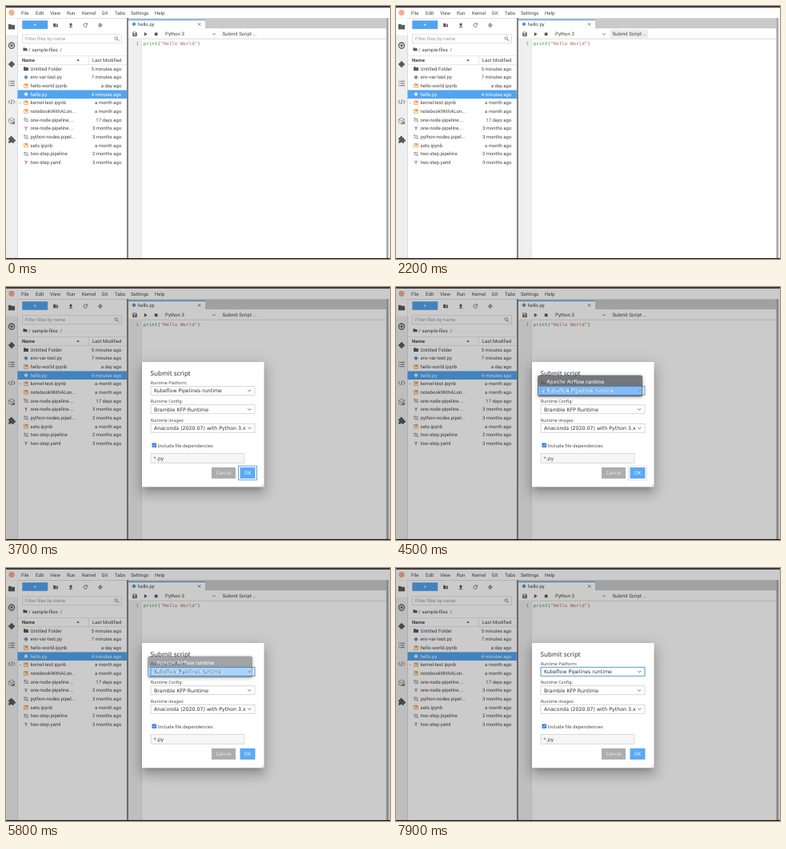
Animation, 480 px wide and 317 px high, one loop 8000 ms. Source, as an HTML page:

```html
<!DOCTYPE html>
<html lang="en">
<head>
<meta charset="utf-8">
<title>Submit script</title>
<style>
html, body { margin: 0; width: 100%; height: 100%; overflow: hidden; background: #fff; }
svg { display: block; width: 480px; height: 317px; }
text { font-family: Roboto, sans-serif; font-size: 6px; fill: #444; text-rendering: geometricPrecision; white-space: pre; }
.form text { font-family: "Noto Sans", sans-serif; }
.form .value { font-family: "DejaVu Sans", sans-serif; }
.menu text { font-family: Inter, sans-serif; }
.mono { font-family: "DejaVu Sans Mono", monospace; }
</style>
</head>
<body>
<svg id="stage" viewBox="0 0 480 317">
  <g id="app"></g>
  <g id="hover"></g>
  <g id="submit"></g>
  <g id="modal">
    <g id="shade"></g>
    <g id="dialog" class="form"></g>
    <g id="okFocus"></g>
    <g id="selectFocus"></g>
    <g id="popup" class="menu"></g>
  </g>
</svg>
<script>
const LOOP = 8000;
const BLUE = '#52a4f0';
const INK = '#5a5a5a';
const $ = id => document.getElementById(id);

function add(parent, tag, attrs, content) {
  const el = document.createElementNS('http://www.w3.org/2000/svg', tag);
  for (const k in attrs) el.setAttribute(k, attrs[k]);
  if (content) el.textContent = content;
  parent.appendChild(el);
  return el;
}
const rect = (p, x, y, width, height, fill, more) => add(p, 'rect', { x, y, width, height, fill, ...more });
const line = (p, d, stroke = INK, width = 0.8) => add(p, 'path', { d, fill: 'none', stroke, 'stroke-width': width });
const shape = (p, d, fill = INK) => add(p, 'path', { d, fill });
const dot = (p, cx, cy, r, fill, more) => add(p, 'circle', { cx, cy, r, fill, ...more });
function text(p, x, y, str, size = 6, { cls = '', fill, ...more } = {}) {
  const el = add(p, 'text', { x, y, class: cls, ...more }, str);
  el.style.fontSize = size + 'px';
  if (fill) el.style.fill = fill;
  return el;
}
// Same geometry as a CSS box-shadow: vertical offset, blur and spread.
function shadow(p, x, y, w, h, dy, blur, spread, opacity) {
  const el = rect(p, x - spread, y - spread + dy, w + 2 * spread, h + 2 * spread, '#000', { opacity });
  el.style.filter = `blur(${blur / 2}px)`;
}

const folder = (p, x, y, s = 1, fill = INK) =>
  add(p, 'path', { d: 'M-3-2.4h2.3l.8.8H3v4H-3z', fill, transform: `translate(${x} ${y}) scale(${s})` });
const diamond = (p, x, y, side, fill) =>
  rect(p, x - side / 2, y - side / 2, side, side, fill, { transform: `rotate(45 ${x} ${y})` });

const icons = {
  folder,
  python: (p, x, y, fill = '#5a94c8') => diamond(p, x, y, 3.9, fill),
  notebook(p, x, y) {
    rect(p, x - 2.3, y - 2.3, 4.6, 4.6, 'none', { stroke: '#ef9a4a', 'stroke-width': 0.8 });
    shape(p, `M${x - 0.9} ${y - 2.2}h2.3v3l-1.1-.8-1.2.8z`, '#ef8d32');
  },
  pipeline(p, x, y) {
    line(p, `M${x - 2.4} ${y - 1.7}h3.4q1.4 0 1.4 .9t-1.4 .8h-2q-1.4 0-1.4 .9t1.4 .9h3.4`, '#8a8a8a', 0.7);
    dot(p, x - 2, y - 1.7, 0.8, '#777');
    dot(p, x + 2, y + 1.8, 0.8, '#777');
  },
  yaml: (p, x, y) => line(p, `M${x - 1.6} ${y - 2.2}l1.6 2.3 1.6-2.3M${x} ${y}v2.4`, '#c8415a', 0.9)
};

function drawMenu(p) {
  rect(p, 0, 0, 480, 317, '#fff');
  dot(p, 7, 8.3, 3.6, '#f3ae92');
  const items = { File: 19, Edit: 37, View: 55, Run: 76, Kernel: 95, Git: 119.5, Tabs: 136, Settings: 156, Help: 186 };
  for (const name in items) text(p, items[name], 10.8, name, 6.1);
  rect(p, 0, 15, 480, 0.6, '#ccc');
}

function drawSidebar(p) {
  rect(p, 0, 15.5, 14.5, 301, '#eeeeee');
  rect(p, 14, 15.5, 0.6, 301, '#c8c8c8');
  rect(p, 0, 15.5, 14.5, 21, '#fff');
  folder(p, 7, 26, 1.35);
  dot(p, 7, 49.5, 3.5, 'none', { stroke: INK, 'stroke-width': 1.3 });
  rect(p, 5.6, 48.1, 2.8, 2.8, INK);
  diamond(p, 7, 73, 6, INK);
  for (const y of [94.3, 97, 99.7]) line(p, `M3.2 ${y}h1.2M5.4 ${y}h5.4`, INK, 0.9);
  line(p, 'M5 117.8l-2 2.4 2 2.4M9 117.8l2 2.4-2 2.4M7.7 117.4l-1.4 5.6', INK, 0.8);
  line(p, 'M7 140l3.4 2v4l-3.4 2-3.4-2v-4zM3.6 142l3.4 2 3.4-2M7 144v4', '#808080', 0.7);
  dot(p, 9.5, 146.5, 1.7, '#808080');
  shape(p, 'M3.2 165h2a1.5 1.5 0 1 1 2.8 0h2v2.2a1.4 1.4 0 1 1 0 2.6v1.9h-2.1a1.4 1.4 0 0 0-2.6 0H3.2v-2.3a1.4 1.4 0 0 0 0-2.4z');
}

const files = [
  ['folder', 'Untitled Folder', '5 minutes ago'],
  ['python', 'env-var-test.py', '7 minutes ago'],
  ['notebook', 'hello-world.ipynb', 'a day ago'],
  ['python', 'hello.py', '4 minutes ago'],
  ['notebook', 'kernel-test.ipynb', 'a month ago'],
  ['notebook', 'notebookWithALon...', 'a month ago'],
  ['pipeline', 'one-node-pipeline....', '17 days ago'],
  ['yaml', 'one-node-pipeline....', '3 months ago'],
  ['pipeline', 'python-nodes.pipel...', '3 months ago'],
  ['notebook', 'sets.ipynb', 'a month ago'],
  ['pipeline', 'two-step.pipeline', '2 months ago'],
  ['yaml', 'two-step.yaml', '3 months ago']
];

function drawBrowser(p) {
  rect(p, 20.3, 18.2, 31.9, 10.6, BLUE);
  line(p, 'M36.2 21.8v3.4M34.5 23.5h3.4', '#fff', 0.6);
  folder(p, 62, 24, 0.95);
  line(p, 'M62.8 23v2.4M61.6 24.2h2.4', '#fff', 0.6);
  shape(p, 'M81 21l2.4 2.5H82v2h-2v-2h-1.4zM78.7 26.2h4.6v.8h-4.6z');
  line(p, 'M101.2 22.6a2.3 2.3 0 1 0 .3 2M101.6 21.4v1.8h-1.8', INK, 0.8);
  line(p, 'M115.2 24.2l2.6-2.6 2.5 2.5-2.6 2.6zM117.8 21.4v5M116 24h4.2', INK, 0.7);

  rect(p, 20.3, 35.8, 124.4, 10.8, '#fff', { stroke: '#cfcfcf', 'stroke-width': 0.6 });
  text(p, 24, 43.4, 'Filter files by name', 6, { fill: '#999' });
  dot(p, 137.8, 40.4, 1.8, 'none', { stroke: '#666', 'stroke-width': 0.7 });
  line(p, 'M139.2 41.8l2.2 2.2', '#666', 0.8);
  folder(p, 24, 54.3, 0.85);
  text(p, 28.2, 56.5, '/', 6);
  text(p, 32.5, 56.5, 'sample-files', 6);
  text(p, 67.5, 56.5, '/', 6);

  rect(p, 14.5, 62.3, 136, 0.5, '#d0d0d0');
  rect(p, 14.5, 73, 136, 0.5, '#d0d0d0');
  rect(p, 103, 62.5, 0.5, 10.5, '#d0d0d0');
  text(p, 20, 69.8, 'Name', 6, { 'font-weight': 600 });
  shape(p, 'M88.2 68.8l1.9-2.4 1.9 2.4z');
  text(p, 144.3, 69.8, 'Last Modified', 6, { 'text-anchor': 'end' });

  files.forEach(([kind, name, age], i) => {
    const y = 78.6 + i * 10.66;
    const on = name === 'hello.py';
    const fill = on ? '#fff' : '#444';
    if (on) rect(p, 14.5, y - 5.2, 136.4, 10.6, BLUE);
    icons[kind](p, 25, y, on ? '#d8ecff' : undefined);
    text(p, 30.5, y + 2.1, name, 6.08, { fill });
    text(p, 144.3, y + 2.1, age, 5.95, { 'text-anchor': 'end', fill });
  });
  dot(p, 17.6, 121.4, 0.5, '#555');
}

function drawEditor(p) {
  rect(p, 150.9, 15, 2.3, 301, '#858588');
  rect(p, 153, 15.5, 322.5, 12.7, '#cacaca');
  rect(p, 153, 17.2, 96, 11.2, '#fff');
  rect(p, 153, 17, 96, 1, BLUE);
  icons.python(p, 160, 22.8);
  text(p, 164.8, 25, 'hello.py', 6.1);
  line(p, 'M239.9 21.2l3.4 3.4M243.3 21.2l-3.4 3.4', '#555', 0.7);

  rect(p, 153, 28.3, 322, 12.9, '#fff');
  shape(p, 'M158.3 32.4h4.2l1.1 1.1v4.4h-5.3z');
  rect(p, 159.2, 33, 2.9, 1.4, '#fff');
  dot(p, 161, 36.2, 0.9, '#fff');
  shape(p, 'M172.8 32.7l3.9 2.5-3.9 2.5z');
  rect(p, 185.8, 33.4, 3.7, 3.7, INK);
  text(p, 199, 37, 'Python 3', 6.1);
  line(p, 'M258.2 34.2l1.8 1.8 1.8-1.8', '#555', 0.7);

  rect(p, 153, 40.8, 322, 0.6, '#c4c4c4');
  rect(p, 153, 41.4, 17, 275, '#efefef');
  rect(p, 169.6, 41.4, 0.5, 275, '#ddd');
  text(p, 162.6, 49.4, '1', 5.8, { cls: 'mono', fill: '#8a8a8a' });
  const code = text(p, 171.7, 49.4, '', 5.92, { cls: 'mono' });
  for (const [str, fill] of [['print', '#3f963f'], ['(', '#555'], ['"Hello World"', '#bd5c60'], [')', '#555']])
    add(code, 'tspan', { style: `fill:${fill}` }, str);

  rect(p, 475.4, 15, 2.9, 301, '#a9a9ac');
  rect(p, 478.3, 15, 1.7, 301, '#f4f4f4');
  rect(p, 0, 0, 480, 2, '#3c3b42');
  rect(p, 0, 315.9, 480, 1.1, '#111');
}

function drawSelect(p, y, label, value) {
  text(p, 180.8, y - 2.4, label, 5.3);
  rect(p, 181, y, 130, 11, '#fff', { stroke: '#bdbdbd', 'stroke-width': 0.6 });
  text(p, 185, y + 7.7, value, 6.28, { cls: 'value', fill: '#333' });
  line(p, `M302.4 ${y + 4.6}l1.9 1.9 1.9-1.9`, '#444', 0.8);
}

function drawDialog(p) {
  const shade = $('shade');
  const box = [170, 94, 152.6, 156.4];
  rect(shade, 0, 2, 480, 314, '#000', { opacity: 0.205 });
  shadow(shade, ...box, 4.9, 6.7, -3.1, 0.2);
  shadow(shade, ...box, 8.9, 13.8, 1.3, 0.14);
  shadow(shade, ...box, 4, 16.9, 3.6, 0.12);

  rect(p, ...box, '#fff', { rx: 0.8 });
  text(p, 180.6, 111.4, 'Submit script', 8.1, { fill: '#333' });
  drawSelect(p, 124.3, 'Runtime Platform:', 'Kubeflow Pipelines runtime');
  drawSelect(p, 147.8, 'Runtime Config:', 'Bramble KFP Runtime');
  drawSelect(p, 171.2, 'Runtime images:', 'Anaconda (2020.07) with Python 3.x');
  rect(p, 182.5, 195.4, 5.6, 5.6, '#3b78d8', { rx: 0.8 });
  line(p, 'M183.6 198.2l1.3 1.4 2.1-2.9', '#fff', 0.8);
  text(p, 189.8, 200.9, 'Include file dependencies', 5.75);
  rect(p, 181, 208.6, 117, 11.8, '#f6f6f6', { stroke: '#c6c6c6', 'stroke-width': 0.6 });
  text(p, 184.6, 216.8, '*.py', 6.2, { cls: 'value' });
  rect(p, 257, 226, 30, 14, '#adadad');
  text(p, 272, 235, 'Cancel', 6.1, { 'text-anchor': 'middle', fill: '#eee' });
  rect(p, 292.5, 226, 19, 14, '#5aaaf5');
  text(p, 302, 235, 'OK', 6.1, { 'text-anchor': 'middle', fill: '#fff' });
  line(p, 'M319 250l3-3M320.7 250l1.3-1.3', '#888', 0.4);

  rect($('okFocus'), 290.6, 224.2, 22.8, 17.6, 'none', { stroke: '#4d88b4', 'stroke-width': 0.8 });
  rect($('selectFocus'), 181, 124.3, 130, 11, 'none', { stroke: '#4f9be0', 'stroke-width': 0.9 });
}

function drawPopup(p) {
  shadow(p, 177, 110.4, 131.2, 27, 1, 4, 0.5, 0.3);
  rect(p, 177, 110.4, 131.2, 27, '#484a51', { rx: 3 });
  rect(p, 178, 124.5, 129.2, 10.8, '#58a6f6');
  text(p, 188.3, 121.2, 'Apache Airflow runtime', 6.4, { fill: '#f4f4f4', 'font-weight': 500 });
  text(p, 188.3, 132.3, 'Kubeflow Pipelines runtime', 6.4, { fill: '#fff', 'font-weight': 500 });
  line(p, 'M183 130.2l1.2 1.5 2-3.6', '#fff', 0.8);
}

drawMenu($('app'));
drawSidebar($('app'));
drawBrowser($('app'));
drawEditor($('app'));
rect($('hover'), 267.5, 29.3, 47.5, 11.4, '#ededed');
text($('submit'), 270.5, 37, 'Submit Script ...', 6.1);
drawDialog($('dialog'));
drawPopup($('popup'));

// Share of an eight-step fade that starts at the given time.
const fade = (t, start) => Math.max(0, Math.min(8, Math.floor((t - start) / 100) + 1)) / 8;

function render(t) {
  const opened = fade(t, 4000);
  $('hover').style.display = t >= 2000 && t < 2400 ? '' : 'none';
  $('modal').style.display = t >= 2400 ? '' : 'none';
  $('okFocus').style.opacity = 1 - opened;
  $('selectFocus').style.opacity = opened;
  $('popup').style.opacity = opened - fade(t, 5500);
}

const start = performance.now();
function tick(now) {
  render(Math.max(0, now - start) % LOOP);
  requestAnimationFrame(tick);
}
render(0);
requestAnimationFrame(tick);
</script>
</body>
</html>
```
